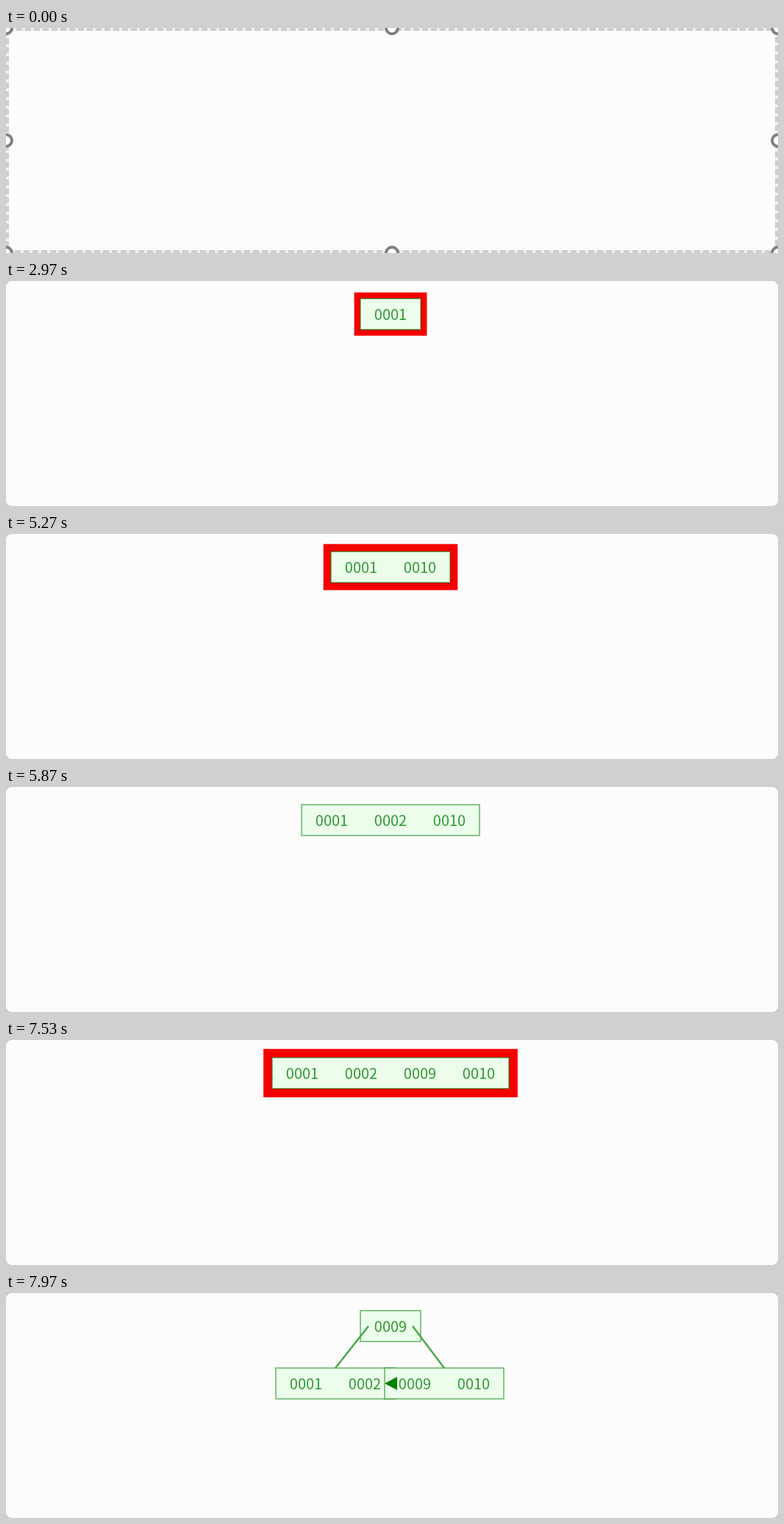
These frames come from a looping animation (1050 by 306 pixels, 8000 ms). An HTML page with a canvas:

```html
<!DOCTYPE html>
<html lang="en">
<head>
<meta charset="utf-8">
<title>Tree insertion</title>
<style>
html, body { margin: 0; width: 100%; height: 100%; overflow: hidden; background: #fcfcfc; }
canvas { display: block; }
</style>
</head>
<body>
<canvas id="stage" width="1050" height="306"></canvas>
<script>
const W = 1050, H = 306, LOOP = 8000, CX = 523, CY = 45;
const GREEN = '#2c982c', PAPER = '#fcfcfc';
const ctx = document.getElementById('stage').getContext('2d');
ctx.font = '500 20px "Noto Sans CJK JP", "Noto Sans CJK SC", "Noto Sans CJK", "Noto Sans", sans-serif';
ctx.textAlign = 'center';

// Each state holds from its start time: [start, keys, highlighted]
const states = [
  [0, [], false],
  [1130, ['0001'], false],
  [2970, ['0001'], true],
  [3370, ['0001', '0010'], false],
  [5270, ['0001', '0010'], true],
  [5670, ['0001', '0002', '0010'], false],
  [6850, ['0001', '0002', '0010'], true],
  [7270, ['0001', '0002', '0009', '0010'], true]
];
const SPLIT = 7670, LAST = 7970;

// Highlight margin: triangle wave from 6 to 16 px
function pulse(t) {
  const phase = (t - 6915 + 4 * 2100) % 2100 / 1050;
  return 16 - 10 * Math.abs(phase - 1);
}

function node(x, y, keys, margin = 0) {
  const w = 80 * keys.length + 2, h = 42, left = x - w / 2, top = y - h / 2;
  if (margin) {
    ctx.fillStyle = '#f60000';
    ctx.fillRect(left - margin, top - margin, w + 2 * margin, h + 2 * margin);
  }
  ctx.fillStyle = '#ecfdec';
  ctx.fillRect(left, top, w, h);
  ctx.strokeStyle = 'rgba(0,128,0,.45)';
  ctx.lineWidth = 2;
  ctx.strokeRect(left, top, w, h);
  ctx.fillStyle = GREEN;
  keys.forEach((key, i) => ctx.fillText(key, x + 80 * (i - (keys.length - 1) / 2), y + 8));
}

function line(x1, y1, x2, y2) {
  ctx.strokeStyle = '#4aa84a';
  ctx.lineWidth = 2.5;
  ctx.beginPath();
  ctx.moveTo(x1, y1);
  ctx.lineTo(x2, y2);
  ctx.stroke();
}

function splitTree(t) {
  const p = (Math.min(t, LAST) - SPLIT) / (LAST - SPLIT);
  const y = CY + 78 * p, left = CX - 75 * p, right = CX + 73 * p;
  node(left, y, ['0001', '0002']);
  node(right, y, ['0009', '0010']);
  node(CX, CY, ['0009']);
  line(CX - 30, CY, left, y - 21);
  line(CX + 30, CY, right, y - 21);
  const tip = right - 81;
  ctx.fillStyle = '#008000';
  ctx.beginPath();
  ctx.moveTo(tip, y);
  ctx.lineTo(tip + 17, y - 9);
  ctx.lineTo(tip + 17, y + 9);
  ctx.fill();
}

function selectionFrame(alpha) {
  ctx.save();
  ctx.globalAlpha = alpha;
  ctx.lineWidth = 4;
  ctx.strokeStyle = '#f0f0f0';
  ctx.strokeRect(2, 2, W - 4, H - 4);
  ctx.strokeStyle = '#cfcfcf';
  ctx.setLineDash([8, 4]);
  ctx.strokeRect(2, 2, W - 4, H - 4);
  ctx.setLineDash([]);
  ctx.strokeStyle = '#808080';
  ctx.fillStyle = '#fff';
  for (const x of [0, W / 2, W]) {
    for (const y of [0, H / 2, H]) {
      if (x === W / 2 && y === H / 2) continue;
      ctx.beginPath();
      ctx.arc(x, y, 8, 0, 2 * Math.PI);
      ctx.fill();
      ctx.stroke();
    }
  }
  ctx.restore();
}

function draw(t) {
  ctx.fillStyle = '#c8c8c8';
  ctx.fillRect(0, 0, W, H);
  ctx.fillStyle = PAPER;
  ctx.beginPath();
  ctx.roundRect(0, 0, W, H, 8);
  ctx.fill();
  if (t < 200) selectionFrame(Math.min(1, (200 - t) / 170));
  if (t >= SPLIT) return splitTree(t);
  const [, keys, lit] = states.findLast(s => t >= s[0]);
  if (keys.length) node(CX, CY, keys, lit ? pulse(t) : 0);
}

const start = performance.now();
function tick() {
  draw((performance.now() - start) % LOOP);
  requestAnimationFrame(tick);
}
tick();
</script>
</body>
</html>
```
